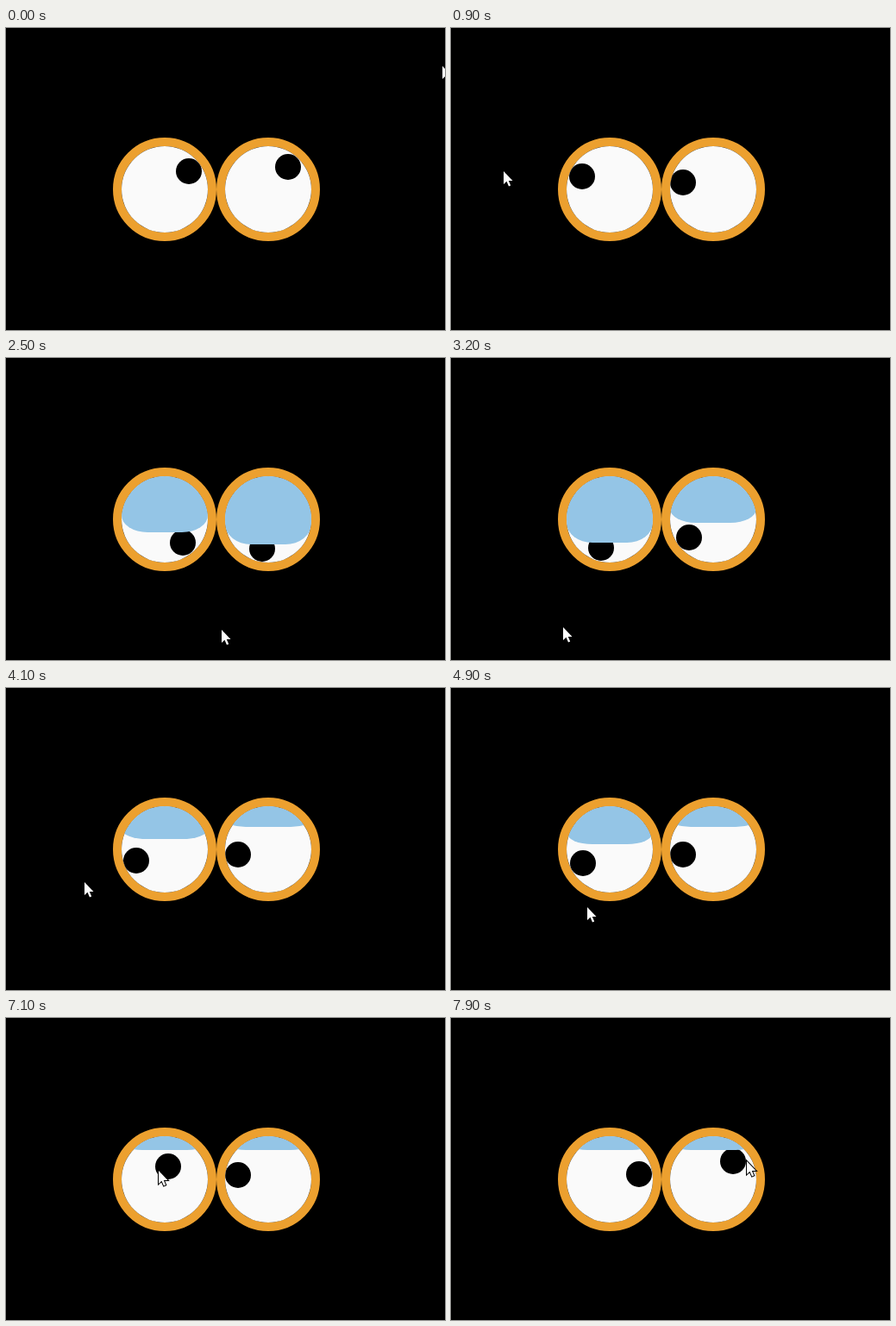
Write an HTML page with a canvas that moves like this. It is 509 px wide and 350 px high and loops after 8 s.

```html
<!DOCTYPE html>
<html lang="en">
<head>
<meta charset="utf-8">
<title>Watching eyes</title>
<style>
html, body { margin: 0; width: 100%; height: 100%; overflow: hidden; background: #000; }
canvas { display: block; }
</style>
</head>
<body>
<canvas id="stage" width="509" height="350"></canvas>
<script>
const LOOP = 8000, STEP = 100;
const ctx = document.getElementById('stage').getContext('2d');

// Turning points of the pointer: time, x, y
const path = [
  [-100, 536, -64], [0, 506, 44], [800, 70, 133], [900, 61, 166],
  [1500, 280, 324], [2000, 395, 291], [2500, 250, 315], [3200, 130, 312],
  [3600, 91, 225], [4700, 91, 225], [4800, 115, 225], [4900, 158, 254],
  [5500, 215, 281], [6100, 226, 245], [6200, 236, 190], [6500, 250, 150],
  [7400, 140, 190], [7700, 311, 166], [7900, 343, 166]
];
const arrow = new Path2D('M0 0V15L3.5 11.8L6 17.5L8.2 16.5L5.8 11H10.5Z');

const ramp = (t, from, to) => Math.min(1, Math.max(0, (t - from) / (to - from)));

function pointerAt(t) {
  const i = Math.max(1, path.findIndex(p => p[0] >= t));
  const [t0, x0, y0] = path[i - 1], [t1, x1, y1] = path[i];
  const k = ramp(t, t0, t1);
  return [x0 + (x1 - x0) * k, y0 + (y1 - y0) * k];
}

function disc(x, y, r, color) {
  ctx.beginPath();
  ctx.arc(x, y, r, 0, 7);
  ctx.fillStyle = color;
  ctx.fill();
}

function drawEye(cx, cy, [mx, my], t) {
  const dx = mx - cx, dy = my - cy;
  const k = Math.min(1, 35 / (Math.hypot(dx, dy) || 1));
  const px = Math.floor(dx * k), py = Math.floor(dy * k);

  // The lid follows the gaze, then blinks and stays slightly lowered
  const reopen = ramp(t, 6200, 6500);
  const close = .65 * ramp(t, 6000, 6200) - .49 * reopen;
  const gaze = (1 - reopen) * Math.max(0, 12 + 1.98 * py);
  const lid = Math.round(gaze + (100 - gaze) * close);

  ctx.beginPath();
  ctx.arc(cx, cy, 55, 0, 7);
  ctx.lineWidth = 10;
  ctx.strokeStyle = '#eca02f';
  ctx.stroke();
  disc(cx, cy, 50, '#fafafa');

  ctx.save();
  ctx.clip();
  disc(cx + px, cy + py, 15, '#000');
  if (lid > 0) {
    const corner = { x: 30, y: lid * .3 };
    ctx.beginPath();
    ctx.roundRect(cx - 50, cy - 50, 100, lid, [0, 0, corner, corner]);
    ctx.fillStyle = '#94c5e6';
    ctx.fill();
  }
  ctx.restore();
}

function drawPointer([x, y]) {
  ctx.save();
  ctx.translate(Math.round(x), Math.round(y));
  ctx.lineWidth = 2;
  ctx.strokeStyle = '#000';
  ctx.stroke(arrow);
  ctx.fillStyle = '#fff';
  ctx.fill(arrow);
  ctx.restore();
}

function draw(now) {
  const t = Math.floor(now % LOOP / STEP) * STEP;
  const target = pointerAt(t - STEP); // the eyes lag one step behind
  ctx.fillStyle = '#000';
  ctx.fillRect(0, 0, 509, 350);
  for (const cx of [184, 304]) drawEye(cx, 187, target, t);
  drawPointer(pointerAt(t));
}

let start;
function tick(now) {
  start ??= now;
  draw(now - start);
  requestAnimationFrame(tick);
}
draw(0);
requestAnimationFrame(tick);
</script>
</body>
</html>
```
